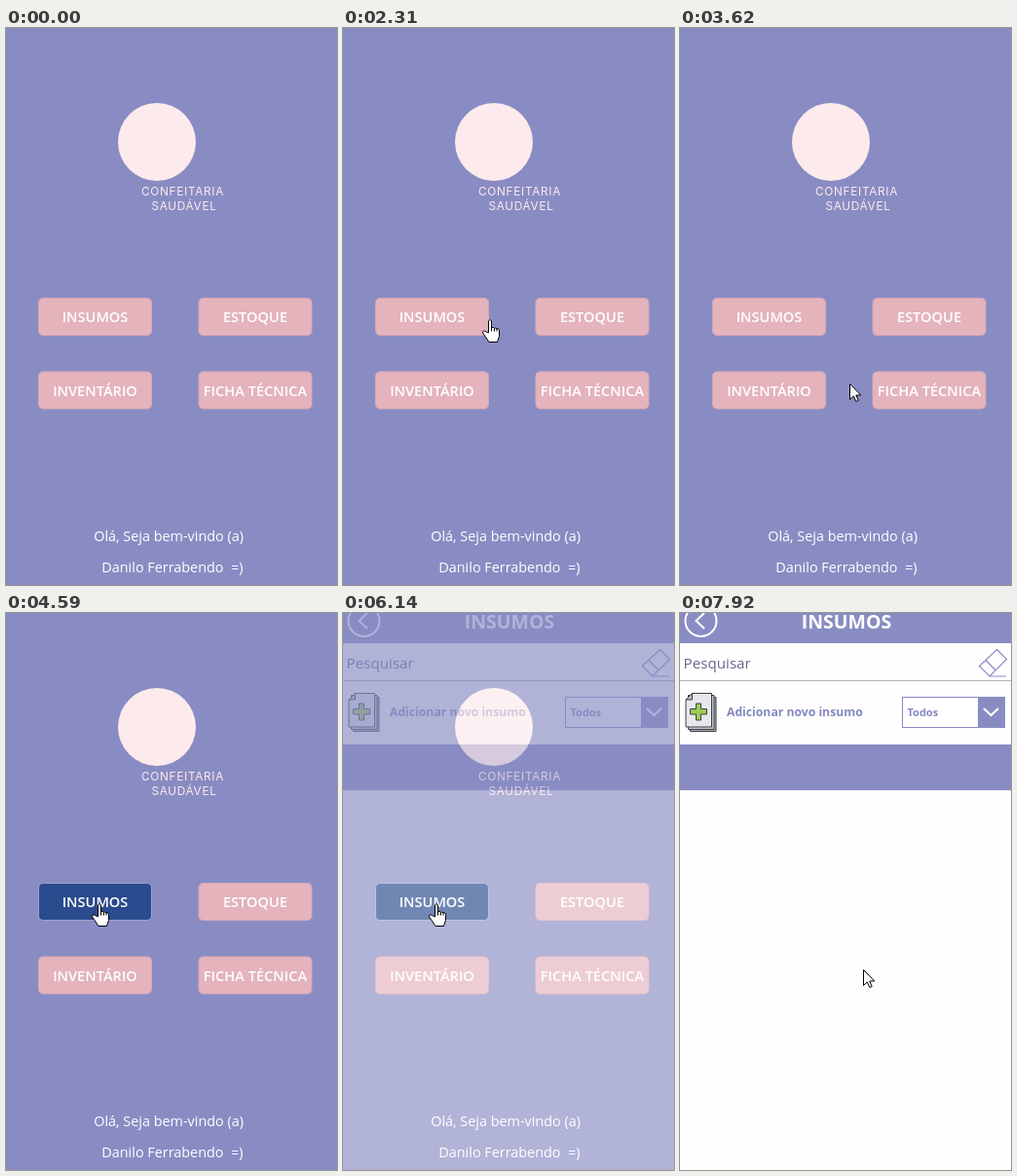
These frames come from a looping animation (340x572 px, 7990 ms). An HTML page:

```html
<!DOCTYPE html>
<html lang="pt">
<head>
<meta charset="utf-8">
<title>Insumos</title>
<style>
  html, body { margin: 0; width: 100%; height: 100%; overflow: hidden; background: #898cc3; }
  svg { display: block; }
  text { font-family: "Open Sans", sans-serif; white-space: pre; }
  .btn text { font-size: 14.6px; font-weight: 600; fill: #fff; text-anchor: middle; }
  .btn rect { fill: #e4b3bc; stroke: #d8a8b6; }
  .btn.hover rect { fill: #2a4b8d; stroke: #9aa3d0; }
  .btn.down rect { fill: #234079; stroke: #dfe2f2; }
  .tag text { font: 11.8px Inter, sans-serif; letter-spacing: .7px; fill: #fdeaec; text-anchor: middle; }
  .hello text { font-size: 14.4px; fill: #fff; text-anchor: end; }
  .line { fill: none; stroke: #898cc3; stroke-width: 1.2; }
  .bold { font-weight: 700; fill: #8488c0; }
  .cursor { fill: #fff; stroke: #000; stroke-linejoin: round; }
</style>
</head>
<body>
<svg width="340" height="572" viewBox="0 0 340 572">
  <rect width="340" height="572" fill="#898cc3"/>
  <circle cx="155" cy="117" r="40" fill="#fdeaec"/>
  <g class="tag">
    <text x="181.5" y="172">CONFEITARIA</text>
    <text x="183" y="186.5">SAUDÁVEL</text>
  </g>
  <g id="buttons"></g>
  <g class="hello">
    <text x="244" y="527">Olá, Seja bem-vindo (a)</text>
    <text x="243.5" y="559">Danilo Ferrabendo  =)</text>
  </g>

  <g id="list">
    <rect width="340" height="572" fill="#fefefe"/>
    <rect width="340" height="31" fill="#898cc3"/>
    <g fill="none" stroke="#fff" stroke-width="2">
      <circle cx="21.5" cy="8" r="16"/>
      <path d="M25 0l-8.5 8l8.5 8"/>
    </g>
    <text x="171" y="16" font-size="19.5" font-weight="700" fill="#fff" text-anchor="middle">INSUMOS</text>
    <text x="3.5" y="57" font-size="15.2" fill="#66668f">Pesquisar</text>
    <path d="M0 69.5H340" stroke="#b4b4ba"/>
    <path class="line" d="M325.5 37.5l10 10L318 65l-10.500 -10.500zM314 48.5l10.500 10.500M317 65h18"/>
    <g stroke="#3c3e42" stroke-linejoin="round">
      <rect x="10.5" y="86.5" width="26.5" height="35" fill="#a9adb4"/>
      <rect x="8.5" y="84.5" width="26.5" height="35" fill="#c5c9d0"/>
      <path d="M12.5 82.5h20V117H6V89z" fill="#e6e8ec"/>
      <path d="M12.5 82.5V89H6z" fill="#b9bdc4"/>
      <path d="M16.5 93h5v5.500h6v5.500h-6v6h-5v-6h-6v-5.500h6z" fill="#9ccb55"/>
    </g>
    <text class="bold" x="48" y="106" font-size="12.2">Adicionar novo insumo</text>
    <rect x="228.5" y="86.5" width="105" height="31" fill="#fff" stroke="#898cc3"/>
    <rect x="306" y="87" width="27" height="30" fill="#898cc3"/>
    <path d="M312 98l7.5 7l7.5 -7" fill="none" stroke="#fff" stroke-width="2.2"/>
    <text class="bold" x="233.5" y="106" font-size="11">Todos</text>
    <rect y="135" width="340" height="47" fill="#898cc3"/>
  </g>

  <g id="pointer" class="cursor">
    <path id="arrow" d="M.5 .5v16l3.800 -3.500l2.500 5.500l2.400 -1l-2.400 -5.500h4.900z"/>
    <path id="hand" d="M-.5 14V2q1.500 -3 3 0v7q1.500 -2 3 .5q1.500 -1.500 2.500 .5q2 -1 2.500 1.500v6l-2 6H0l-3 -4.500l-3.500 -5q0 -3 3 -1.500zM2.500 9v3.500M5.500 9.500v3M8 10v2.500"/>
  </g>
</svg>
<script>
const LOOP = 7990, STEP = 70;
const $ = id => document.getElementById(id);

const buttons = ["INSUMOS", "ESTOQUE", "INVENTÁRIO", "FICHA TÉCNICA"].map((label, i) => {
  const x = 33 + 164.5 * (i % 2), y = 277 + 75.5 * (i >> 1);
  $("buttons").insertAdjacentHTML("beforeend",
    `<g class="btn"><rect x="${x + .5}" y="${y + .5}" width="116" height="38" rx="4.5"/>
     <text x="${x + 58.5}" y="${y + 25}">${label}</text></g>`);
  return { x, y, el: $("buttons").lastElementChild };
});

// Where the pointer glides to: arrival time, glide length, x, y
const glides = [
  [1190, 0, 325, 560],
  [1960, 770, 166, 362],
  [2310, 350, 150, 299],
  [2600, 290, 114, 290],
  [2930, 140, 119, 290],
  [3340, 280, 212, 300],
  [3480, 140, 210, 362],
  [3620, 140, 174, 365],
  [3900, 280, 148, 366],
  [4590, 690, 95, 298],
  [6810, 210, 73, 206],
  [6950, 140, 55, 192],
  [7160, 210, 103, 236],
  [7430, 270, 70, 266],
  [7920, 490, 188, 366]
];
const ease = u => u * u * (3 - 2 * u);

function pointerAt(t) {
  let pos = null;
  for (const [end, length, x, y] of glides) {
    const elapsed = t - (end - length);
    if (elapsed < 0) break;
    const u = t >= end ? 1 : ease(Math.floor(elapsed / STEP) * STEP / length);
    pos = pos ? [pos[0] + (x - pos[0]) * u, pos[1] + (y - pos[1]) * u] : [x, y];
  }
  return pos;
}

const over = (b, p) => p && p[0] >= b.x && p[0] <= b.x + 117.5 && p[1] >= b.y && p[1] <= b.y + 39;
const show = (el, on) => el.style.display = on ? "" : "none";

function draw(t) {
  const p = pointerAt(t), before = pointerAt(t - STEP);
  const listAlpha = Math.min(1, Math.max(0, 1 + Math.floor((t - 6140) / 65)) / 3);
  const home = listAlpha < 1;
  const isHand = home && buttons.some(b => over(b, p));

  // Button fills react one step after the pointer arrives
  for (const b of buttons) b.el.classList.toggle("hover", Boolean(home && over(b, before)));
  buttons[0].el.classList.toggle("down", t >= 5580 && t < 5720);

  $("list").style.opacity = listAlpha;
  show($("pointer"), p);
  show($("hand"), isHand);
  show($("arrow"), !isHand);
  if (p) $("pointer").setAttribute("transform", `translate(${p.map(Math.round)})`);
}

const begin = performance.now();
function tick() {
  draw((performance.now() - begin) % LOOP);
  requestAnimationFrame(tick);
}
tick();
</script>
</body>
</html>
```
